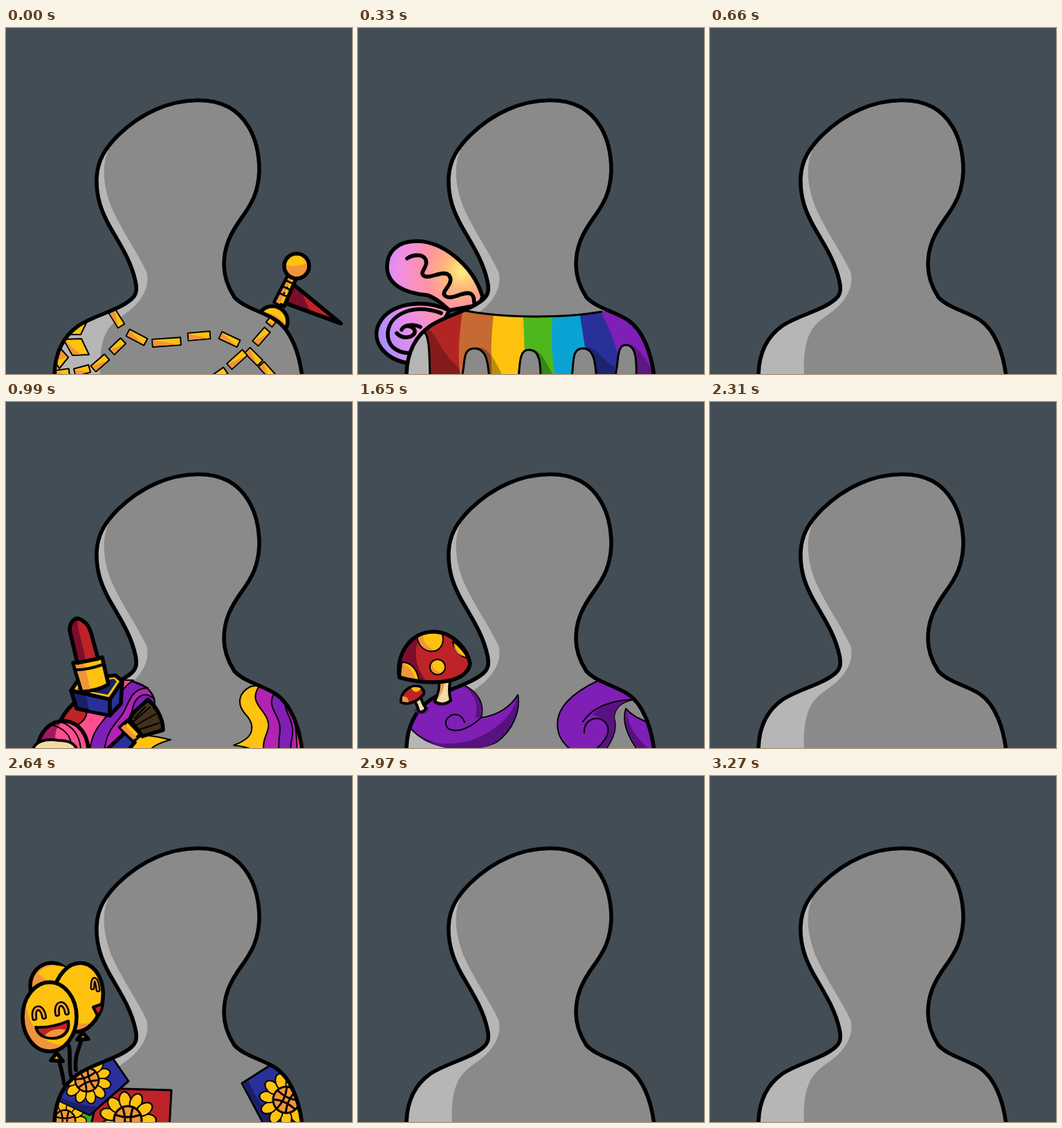
An HTML page for the animation above (3300 ms loop, 500 px wide and 500 px high).

```html
<!DOCTYPE html>
<html lang="en">
<head>
<meta charset="utf-8">
<title>Outfit cycle</title>
<style>
  html, body { margin: 0; width: 100%; height: 100%; overflow: hidden; background: #434d55; }
  svg { display: block; width: 100vw; height: 100vh; }
  /* each outfit owns one 330 ms slot of the loop */
  .look { visibility: hidden; animation: show 3300ms steps(1, end) calc(var(--slot) * 330ms) infinite; }
  @keyframes show { 0% { visibility: visible; } 10%, 100% { visibility: hidden; } }
  .armor { --slot: 0; } .rainbow { --slot: 1; } .makeup { --slot: 3; }
  .fungus { --slot: 5; } .slime { --slot: 6; } .sunny { --slot: 8; }
  .bold { stroke: #000; stroke-width: 5.6; }
  .mid { stroke: #000; stroke-width: 4; }
  .thin { stroke: #000; stroke-width: 2; }
  .none { fill: none; }
  .gold { fill: #ffc20e; } .amber { fill: #f0953a; }
  .red { fill: #bd2327; } .wine { fill: #7d0d2c; }
  .blue { fill: #29309a; } .navy { fill: #1b1f68; }
  .violet { fill: #7f1fb5; } .plum { fill: #581280; }
  .magenta { fill: #b322b3; } .pink { fill: #ff4f8f; }
  .cream { fill: #f2dca4; } .pearl { fill: #dfe3ee; } .steel { fill: #a0a4b8; }
  .dim { fill: #000; fill-opacity: .27; }
</style>
</head>
<body>
<svg viewBox="0 0 500 500" fill="none" stroke-linejoin="round" stroke-linecap="round">
<defs>
  <path id="body" d="M70 504C70 470 82 446 105 430C130 414 161 409 181 392C188 386 190 379 187 366C181 337 165 313 150 287C139 267 130 246 131 217C132 191 144 173 162 155C196 122 236 105 276 104.5C313 104 335 118 350 142C361 160 366 182 366 206C365 236 356 253 340 275C325 296 315 315 315 342C315 360 321 375 330 389C345 405 372 410 390 422C412 437 424 470 428 504"/>
  <clipPath id="skin"><use href="#body"/></clipPath>
  <radialGradient id="wingTop" gradientUnits="userSpaceOnUse" cx="150" cy="352" r="112">
    <stop offset="0" stop-color="#fff07c"/><stop offset=".22" stop-color="#ffb87c"/>
    <stop offset=".48" stop-color="#ff93a2"/><stop offset=".78" stop-color="#f28ee0"/><stop offset="1" stop-color="#d48cff"/>
  </radialGradient>
  <linearGradient id="wingLow" gradientUnits="userSpaceOnUse" x1="28" y1="450" x2="115" y2="420">
    <stop offset="0" stop-color="#a58cff"/><stop offset=".5" stop-color="#e58cf0"/><stop offset="1" stop-color="#ff93b4"/>
  </linearGradient>
  <g id="flower"></g>
  <g id="eye">
    <path class="mid" d="M-7 8C-8-10 7-10 7 8" style="stroke-width:8"/>
    <path stroke="#f0953a" stroke-width="3" d="M-7 8C-8-10 7-10 7 8"/>
  </g>
</defs>

<rect width="500" height="500" fill="#434d55"/>

<!-- behind the body -->
<g class="look armor">
  <path class="red" d="M411 367L484 427L405 398Z"/>
  <path class="wine" d="M411 367L426 380L440 411L405 398Z"/>
  <path class="bold none" d="M411 367L484 427L405 398Z"/>
  <path class="gold bold" d="M410 353L421 358L402 402L388 396Z"/>
  <path class="amber" d="M411 355L415 357L396 399L390 396Z"/>
  <path class="thin" style="stroke-width:3" d="M405 365L416 370M401 374L412 379M397 384L408 389M411 361h.1M406 375h.1M402 383h.1"/>
  <circle class="gold" cx="420" cy="344" r="18"/>
  <path class="amber" d="M403 341C412 347 427 343 437 339C439 355 428 362 419 362C409 361 402 352 403 341Z"/>
  <circle class="bold" cx="420" cy="344" r="18"/>
  <circle class="gold" cx="385" cy="424" r="22"/>
  <path class="amber" d="M363 412C382 409 394 415 407 432H363Z"/>
  <circle class="bold" cx="385" cy="424" r="22"/>
</g>
<g class="look rainbow bold">
  <path fill="url(#wingLow)" d="M132 408C92 390 45 398 30 428C18 454 40 480 76 485L110 450Z"/>
  <path d="M120 412C82 398 46 412 43 440C42 458 54 469 74 470"/>
  <path d="M63 436C67 428 79 430 82 437C84 446 66 452 56 441M90 432C84 429 75 428 68 431"/>
  <path fill="url(#wingTop)" d="M180 388C165 340 120 308 85 308C55 308 42 325 42 345C42 370 66 383 100 386C112 390 122 399 132 408L176 400Z"/>
  <path d="M71 333C80 327 94 326 98 335C102 346 88 352 95 358C103 364 124 348 132 358C140 370 118 381 126 387C135 395 153 379 163 384C169 388 167 393 168 397"/>
</g>
<g class="look sunny">
  <path class="bold" d="M75 408C80 420 82 432 84 445M91 390C94 405 90 420 94 434M110 377C107 392 98 405 101 425"/>
  <path class="gold bold" d="M73 400L65 411L82 412ZM111 371L103 381L119 380Z"/>
  <ellipse class="amber bold" cx="66" cy="303" rx="31" ry="33"/>
  <path class="gold" d="M46 286C55 272 78 270 92 280L80 310Z"/>
  <g transform="rotate(8 104 320)">
    <ellipse class="gold" cx="104" cy="320" rx="36" ry="50"/>
    <path class="amber" d="M70 335C90 352 115 365 132 350C122 372 92 376 78 356Z"/>
    <ellipse class="bold" cx="104" cy="320" rx="36" ry="50"/>
  </g>
  <path class="mid" style="stroke-width:7" d="M125 306C125 289 131 290 133 309"/>
  <path stroke="#f0953a" stroke-width="2.5" d="M125 306C125 289 131 290 133 309"/>
  <path class="red mid" d="M126 334L140 329C139 338 136 344 132 346Z"/>
  <ellipse class="gold" cx="63" cy="348" rx="39" ry="50"/>
  <path class="amber" d="M28 325C32 360 52 389 84 389C62 406 18 388 25 338Z"/>
  <ellipse class="bold" cx="63" cy="348" rx="39" ry="50"/>
  <use href="#eye" transform="translate(47 341) rotate(-8)"/>
  <use href="#eye" transform="translate(80 335) rotate(-8)"/>
  <path class="red mid" d="M43 363C58 364 76 360 90 354C93 370 82 379 68 379C54 379 46 374 43 363Z"/>
  <path class="amber" d="M56 375C63 366 77 364 86 367C81 376 66 380 56 375Z"/>
</g>

<!-- body and what is worn on it -->
<g clip-path="url(#skin)">
  <path fill="#8a8a8a" d="M60 100H440V504H60Z"/>
  <path fill="#b6b6b6" d="M148 177C137 200 141 235 155 265C168 293 190 325 203 352C207 366 203 382 190 397C175 415 155 420 145 440C136 458 135 480 136 504H50V177Z"/>

  <g class="look armor thin">
    <g id="straps"></g>
    <path class="gold" d="M88 443L99 430L118 422L108 443ZM83 450L109 449L120 472L96 473ZM77 461L90 476L77 492L70 480Z"/>
    <path class="amber" stroke="none" d="M90 442L100 432L116 424ZM85 451L97 472L108 472ZM78 464L87 476L75 480Z"/>
  </g>

  <g class="look rainbow">
    <clipPath id="drips"><path d="M60 400L153 408C210 420 300 419 352 410L440 400V510H402C403 480 402 458 387 458C372 458 378 486 370 510H345C343 485 342 463 325 463C307 463 313 486 308 510H264C264 485 263 465 247 465C231 465 235 490 231 510H190C188 480 185 463 168 463C148 463 157 490 148 510H104C103 470 104 438 91 437L60 440Z"/></clipPath>
    <g clip-path="url(#drips)">
      <path fill="#b32525" d="M60 390H440V510H60Z"/>
      <path fill="#c66a33" d="M154 390C145 445 144 470 148 510H440V390Z"/>
      <path class="gold" d="M199 390C191 445 192 475 194 510H440V390Z"/>
      <path fill="#4db81e" d="M238 390L242 510H440V390Z"/>
      <path fill="#0aa3d4" d="M285 390C276 440 280 475 286 510H440V390Z"/>
      <path class="blue" d="M317 390C325 445 330 470 335 510H440V390Z"/>
      <path class="violet" d="M340 390C365 435 378 465 382 510H440V390Z"/>
      <path class="dim" d="M91 437C108 424 115 462 138 484C146 490 148 495 149 510H100ZM168 463C186 455 199 480 212 510H185ZM247 465C265 460 272 486 287 510H260ZM325 463C343 455 350 479 371 489V510H340ZM387 458C406 455 411 478 428 495V510H400Z"/>
    </g>
    <path class="thin none" style="stroke-width:3" d="M153 408C210 420 300 419 352 410M402 510C403 480 402 458 387 458C372 458 378 486 370 510M345 510C343 485 342 463 325 463C307 463 313 486 308 510M264 510C264 485 263 465 247 465C231 465 235 490 231 510M190 510C188 480 185 463 168 463C148 463 157 490 148 510M104 504C103 470 104 438 91 437"/>
  </g>

  <g class="look makeup thin">
    <path class="gold" d="M60 400L180 403C205 408 218 425 214 440L180 484C205 479 218 484 238 488C220 493 210 498 202 510H60Z"/>
    <path class="violet" d="M60 400L180 403C205 408 218 425 214 440C200 455 182 468 176 510H60Z"/>
    <path class="magenta" d="M60 400L190 406C204 411 211 420 213 428C198 416 186 428 183 443C179 462 165 470 161 510H60Z"/>
    <path class="violet" d="M60 400L180 403L205 413C180 414 178 435 169 450C158 467 143 475 142 510H60Z"/>
    <path class="pink" d="M60 400L184 402C168 412 162 428 152 443C142 464 124 468 120 510H60Z"/>
    <path class="red" d="M60 400L108 426C116 438 122 450 110 462C98 473 85 465 60 478Z"/>
    <path class="gold" d="M354 411C335 420 334 437 345 450C358 463 358 476 349 485C343 490 338 493 329 496C345 498 358 501 369 510H440V400Z"/>
    <path class="magenta" d="M367 409C350 432 370 441 377 457C386 476 366 484 374 510H440V400Z"/>
    <path class="violet" d="M390 419C376 434 389 447 394 461C400 478 390 488 396 510H440V400Z"/>
    <path class="magenta" d="M403 430C402 446 412 456 414 470C416 486 409 492 412 510H440V420Z"/>
    <path class="pink" d="M412 440C419 462 420 482 421 510H440V440Z"/>
  </g>

  <g class="look fungus">
    <path class="violet thin" d="M60 430L150 408C174 418 183 436 178 456C202 453 221 440 231 423C235 446 224 474 201 491C175 507 99 504 75 470L60 470Z"/>
    <path class="plum" d="M230 426C224 452 201 474 168 487C150 495 110 497 90 486C125 508 180 506 201 490C222 474 234 446 230 426ZM152 410C172 424 174 442 169 457L178 455C182 436 173 418 152 410Z"/>
    <path class="thin" d="M154 463C150 448 132 448 127 461C124 478 150 482 178 456"/>
    <path class="violet thin" d="M346 403C300 425 284 449 289 474C291 490 305 500 315 510H352C366 493 376 475 370 456C371 441 382 433 398 430C385 415 365 409 346 403Z"/>
    <path class="plum" d="M339 452C352 437 370 430 396 430C380 434 371 442 370 456C375 472 366 493 352 510H335C352 497 371 478 358 464C352 457 348 454 339 452Z"/>
    <path class="thin" d="M327 478C325 459 347 450 358 464C369 478 352 497 335 508M325 462C340 440 365 431 398 430"/>
    <path class="violet thin" d="M387 443C380 465 394 492 410 510H440V475C420 460 402 460 387 443Z"/>
    <path class="plum" d="M389 447C390 470 404 488 424 504H409C393 488 383 466 389 447Z"/>
  </g>

  <g class="look slime">
    <path class="violet thin" style="stroke-width:3" d="M60 510V400L150 404C142 414 145 423 155 423C175 422 190 407 205 411C217 417 205 430 190 434C165 442 158 455 165 461C180 470 205 440 235 430C255 425 269 430 264 437C255 448 215 450 200 460C190 468 188 478 205 479C225 478 240 465 258 464C274 465 274 479 262 484C240 492 225 488 215 510Z"/>
    <path class="plum" d="M206 427C190 431 172 434 164 443C172 436 182 431 206 427ZM268 476C247 487 228 485 216 496C228 490 258 490 268 476Z"/>
    <g id="blots" style="stroke:#000;stroke-width:3" fill="#2e2c33"></g>
    <path stroke="#000" stroke-width="9" d="M119 445C127 443 130 445 126 452M91 493C98 487 106 487 112 492M148 493C153 489 161 489 167 493M222 443C230 440 236 437 240 440"/>
    <path stroke="#2e2c33" stroke-width="4" d="M119 445C127 443 130 445 126 452M91 493C98 487 106 487 112 492M148 493C153 489 161 489 167 493M222 443C230 440 236 437 240 440"/>
  </g>

  <g class="look sunny thin">
    <path fill="#35a82e" d="M60 480L126 482V510H60Z"/>
    <use href="#flower" transform="translate(85 498) scale(.8)"/>
    <path class="red" style="stroke-width:3" d="M134 451L239 454L236 510H122Z"/>
    <path class="wine" stroke="none" d="M124 470C155 454 180 452 210 456L134 452Z"/>
    <use href="#flower" transform="translate(176 497) scale(1.05)"/>
    <path class="blue" style="stroke-width:3" d="M60 452L153 406L177 441L121 490L70 466Z"/>
    <path class="navy" stroke="none" d="M70 459C92 473 112 476 133 478L121 489L72 468Z"/>
    <use href="#flower" transform="translate(117 439) rotate(-20) scale(.9)"/>
    <path class="blue" style="stroke-width:3" d="M341 444L388 414L440 430V510H376Z"/>
    <path class="navy" stroke="none" d="M342 445L350 440C360 465 376 485 395 505H376Z"/>
    <use href="#flower" transform="translate(405 468) rotate(25)"/>
  </g>
</g>
<use href="#body" class="bold"/>

<!-- in front of the body -->
<g class="look makeup">
  <path class="pink" d="M44 506C47 476 64 460 85 461C106 463 119 481 119 506Z"/>
  <path fill="#a3195f" d="M47 492C50 474 64 462 82 462C71 470 70 482 72 494Z"/>
  <path class="thin" d="M78 462C98 468 107 484 108 502M68 467C84 472 92 482 94 492"/>
  <path class="bold" d="M44 506C47 476 64 460 85 461C106 463 119 481 119 506"/>
  <path class="cream mid" d="M38 506C40 490 57 486 76 489C92 489 101 494 104 506Z"/>
  <path class="blue bold" d="M146 502L172 478L186 492L174 506H142Z"/>
  <path class="gold bold" d="M165 470L176 460L195 480L184 490Z"/>
  <path class="amber" d="M166 471L171 466L189 485L184 488Z"/>
  <path fill="#43301c" class="bold" d="M179 459C181 449 195 440 205 430C217 440 227 457 227 474C214 478 206 480 197 483Z"/>
  <path class="thin" d="M184 462L208 441M188 467L216 451M191 474L221 464M186 457L201 441"/>
  <path class="gold bold" d="M94 417L105 401L158 395L168 403L150 430Z"/>
  <path class="navy" d="M103 415L110 407L156 400L160 404L147 423Z"/>
  <path class="navy bold" d="M94 417L150 430V453L102 443Z"/>
  <path class="blue" d="M116 425L148 432V450L120 445Z"/>
  <path class="blue bold" d="M150 430L168 403L166 436L150 453Z"/>
  <path class="gold bold" d="M97 377L139 369L148 408C137 415 124 418 109 418Z"/>
  <path class="amber" d="M100 380L113 378L122 415L111 416Z"/>
  <path class="mid" d="M102 387C117 387 130 383 141 379"/>
  <path class="red" d="M103 377L92 330C92 320 97 312 105 313C113 316 120 323 123 334L133 371Z"/>
  <path class="wine" d="M103 377L92 330C92 320 97 314 104 314C102 328 112 350 115 375Z"/>
  <path class="bold" d="M103 377L92 330C92 320 97 312 105 313C113 316 120 323 123 334L133 371Z"/>
</g>
<g class="look fungus">
  <path class="plum" d="M106 431C112 441 128 442 138 431ZM80 444C88 455 101 453 103 441Z"/>
  <path class="cream mid" d="M117 402C119 415 114 424 111 433C118 438 128 437 134 431C131 420 131 412 134 400Z"/>
  <path class="amber" d="M119 405H125C124 417 118 426 113 432C119 422 121 414 119 405Z"/>
  <path class="red" d="M60 398C54 366 75 332 109 332C139 332 159 360 162 378C160 390 149 398 135 402C110 408 81 404 60 398Z"/>
  <path class="wine" d="M60 398C56 367 70 342 92 336C80 352 80 380 99 404Z"/>
  <path class="gold thin" d="M86 339C94 332 113 331 122 336C126 352 116 362 104 360C93 358 86 350 86 339ZM137 346C147 353 155 363 158 370C149 368 139 361 137 346ZM64 376C76 376 86 386 88 403L61 398Z"/>
  <path class="amber" d="M87 340L94 337C95 348 101 355 110 358C97 362 88 351 87 340ZM64 378C74 381 81 391 82 401L62 397ZM138 350C142 360 148 365 156 368C146 367 139 360 138 350Z"/>
  <circle class="gold thin" cx="115" cy="383" r="11"/>
  <path class="amber" d="M107 377C108 387 115 391 121 390C112 397 101 386 107 377Z"/>
  <path class="bold" d="M60 398C54 366 75 332 109 332C139 332 159 360 162 378C160 390 149 398 135 402C110 408 81 404 60 398Z"/>
  <path class="cream mid" d="M81 431C86 437 86 442 88 447C93 449 97 446 98 442C94 437 92 432 91 427Z"/>
  <path class="red mid" d="M62 434C61 419 75 408 89 411C95 415 96 419 95 422C87 432 73 439 62 434Z"/>
  <path class="gold" d="M77 413C82 411 88 412 91 414C87 421 79 420 77 413Z"/>
  <path class="amber" d="M64 426C70 424 74 430 73 434L64 433Z"/>
</g>
<g class="look slime">
  <path class="pearl" d="M352 408C340 398 345 388 358 381C393 363 425 360 448 314C454 333 452 354 448 376C462 364 473 352 478 338C482 358 474 376 464 390C476 389 482 384 486 379C489 412 470 446 437 467C428 478 418 484 406 488C385 496 365 502 348 504C330 494 319 478 322 458C324 434 350 428 352 408Z"/>
  <path class="steel" d="M324 456C330 444 337 440 341 442C336 460 344 478 364 498L348 503C332 492 321 476 324 456ZM448 316C449 336 442 350 431 359L421 354C434 346 441 334 448 316ZM478 341C477 360 468 374 456 383L451 376C464 364 473 353 478 341ZM394 366C394 378 388 390 378 398C385 388 388 378 388 367Z"/>
  <path class="thin" style="stroke-width:2.6" d="M330 440C352 428 372 418 386 400C396 386 400 372 399 360M354 408C366 406 378 402 386 398M417 354C422 376 418 398 413 414M421 362C428 370 438 374 449 374M419 382C428 386 438 387 446 385M417 396C430 403 446 405 458 402M413 410C432 420 450 421 470 417M436 434C444 437 452 438 460 436"/>
  <path class="bold" d="M352 408C340 398 345 388 358 381C393 363 425 360 448 314C454 333 452 354 448 376L440 390M448 376C462 364 473 352 478 338C482 358 474 376 464 390L453 413M464 390C476 389 482 384 486 379C489 412 470 446 437 467M348 504C330 494 319 478 322 458C324 434 350 428 352 408"/>
  <circle class="pearl" cx="401" cy="451" r="36"/>
  <path class="steel" d="M367 442C369 466 386 479 412 483C388 494 360 472 367 442Z"/>
  <circle class="bold" cx="401" cy="451" r="36"/>
  <path class="mid" d="M401 458C394 454 388 462 394 468C404 476 420 466 416 452C412 440 394 440 387 452C381 464 388 476 400 479"/>
  <path class="thin" style="stroke-width:2.6" d="M384 421C394 424 402 430 405 441M369 436C376 436 386 442 388 450M368 465C372 458 380 456 386 456M424 424C416 424 404 430 400 441M435 456C430 448 424 446 415 449M412 483C420 478 420 470 415 462"/>
</g>
</svg>
<script>
  const fill = (id, html) => { document.getElementById(id).innerHTML = html; };

  // sunflower: ring of petals around a cross-hatched centre
  let petals = '';
  for (let a = 0; a < 360; a += 360 / 11)
    petals += `<ellipse class="gold thin" cx="27" rx="12" ry="8" transform="rotate(${a})"/>`;
  fill('flower', petals + `<circle class="amber" r="19" style="stroke:#000;stroke-width:3"/>
    <path class="thin" style="stroke-width:3" d="M-7-17Q-1 0-7 17M7-17Q1 0 7 17M-17-7Q0-1 17-7M-17 7Q0 1 17 7"/>`);

  // strap plates: x, y, angle, length
  const plates = [[160, 420, 58, 25], [189, 447, 28, 29], [232, 454, -4, 41], [279, 445, -5, 32],
    [323, 450, 25, 29], [358, 475, 45, 26], [377, 495, 48, 24], [369, 446, -49, 26], [334, 479, -42, 30],
    [383, 425, -50, 9], [310, 500, -35, 18], [161, 460, -44, 23], [136, 484, -41, 26],
    [110, 495, -15, 22], [82, 499, -8, 19]];
  fill('straps', plates.map(([x, y, a, n]) => `<g transform="translate(${x} ${y}) rotate(${a})">
    <rect class="gold" x="${-n / 2}" y="-5.5" width="${n}" height="11"/>
    <path class="amber" stroke="none" d="M${1 - n / 2}-4V4.5H${n / 2 - 2}Z"/></g>`).join(''));

  // slime blots: x, y, rx, ry, angle
  const blots = [[126, 433, 6, 2, -5], [142, 444, 4, 10, -15], [113, 457, 4, 2, 30], [99, 465, 4, 7, 35],
    [127, 481, 4, 6, 15], [160, 480, 9, 3, -15], [182, 426, 8, 3, -30], [200, 417, 5, 2, -25],
    [232, 441, 10, 3, -12], [251, 435, 5, 2, -10], [250, 474, 7, 2, -10], [236, 482, 5, 2, -20],
    [211, 489, 8, 3, -10], [86, 478, 2, 4, 20], [175, 492, 4, 2, -30]];
  fill('blots', blots.map(([x, y, rx, ry, a]) =>
    `<ellipse rx="${rx}" ry="${ry}" transform="translate(${x} ${y}) rotate(${a})"/>`).join(''));
</script>
</body>
</html>
```
